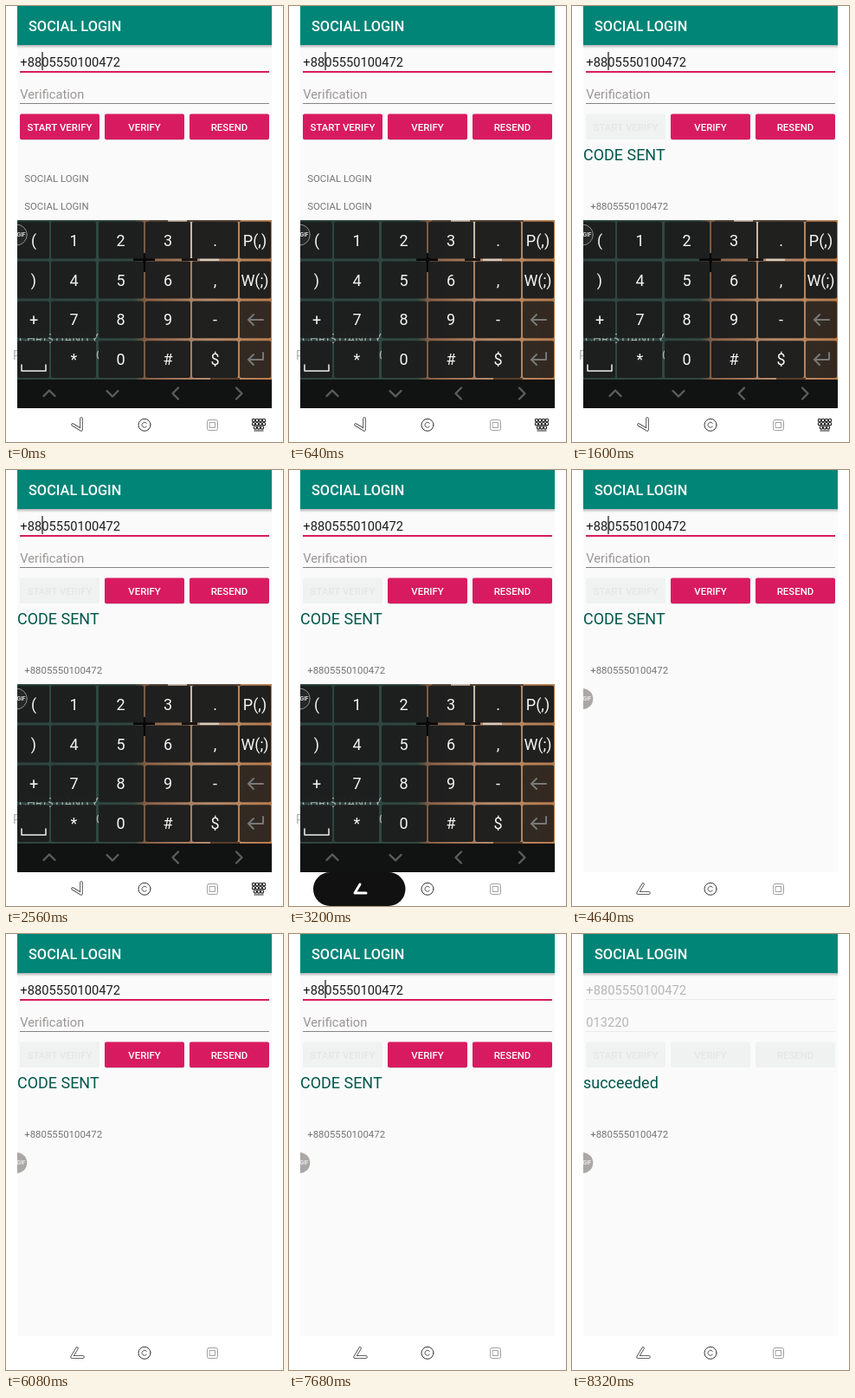
Animation, 320 px wide and 503 px high, one loop 9600 ms. Source, as an HTML page with a canvas:

```html
<!DOCTYPE html>
<html lang="en">
<head>
<meta charset="utf-8">
<title>Social login</title>
<style>
html, body { margin: 0; width: 100%; height: 100%; overflow: hidden; background: #fff; }
canvas { display: block; width: 320px; height: 503px; }
</style>
</head>
<body>
<canvas id="stage"></canvas>
<script>
const W = 320, H = 503, LOOP = 9600;
const LEFT = 13, RIGHT = 307;
const SENT = 1600, PRESS = 3040, TURN = 3200, HIDE = 3360, RELEASE = 3520, DONE = 8320;
// The caret starts visible and flips at each of these times.
const BLINKS = [160, 640, 1120, 1600, 2080, 2560, 3040, 3680, 4160, 4640,
  5120, 5600, 6080, 6560, 7200, 7680, 8160];
const PHONE = '+8805550100472';
const TEAL = '#008577', DEEP = '#00574b', PINK = '#d81b60';

const canvas = document.getElementById('stage');
const ctx = canvas.getContext('2d');
const dpr = window.devicePixelRatio || 1;
canvas.width = W * dpr;
canvas.height = H * dpr;

function rect(x, y, w, h, color) {
  ctx.fillStyle = color;
  ctx.fillRect(x, y, w, h);
}

function round(x, y, w, h, r, color) {
  ctx.beginPath();
  ctx.roundRect(x, y, w, h, r);
  ctx.fillStyle = color;
  ctx.fill();
}

function text(str, x, y, size, color, weight = 400, align = 'left') {
  ctx.font = `${weight} ${size}px Roboto, sans-serif`;
  ctx.textAlign = align;
  ctx.fillStyle = color;
  ctx.fillText(str, x, y);
}

function line(points, color, width) {
  ctx.beginPath();
  points.forEach(([x, y]) => ctx.lineTo(x, y));
  ctx.strokeStyle = color;
  ctx.lineWidth = width;
  ctx.stroke();
}

function ring(x, y, r, color, width, from = 0, to = Math.PI * 2) {
  ctx.beginPath();
  ctx.arc(x, y, r, from, to);
  ctx.strokeStyle = color;
  ctx.lineWidth = width;
  ctx.stroke();
}

function header() {
  const shade = ctx.createLinearGradient(0, 45, 0, 49);
  shade.addColorStop(0, 'rgba(0,0,0,.28)');
  shade.addColorStop(1, 'rgba(0,0,0,0)');
  rect(LEFT, 45, RIGHT - LEFT, 4, shade);
  rect(LEFT, 0, RIGHT - LEFT, 45, TEAL);
  text('SOCIAL LOGIN', 26, 29, 16.33, '#fff', 500);
}

function button(label, x, enabled) {
  if (enabled) {
    round(x, 125.4, 92, 29.4, 2, 'rgba(0,0,0,.18)');
    round(x, 124.5, 92, 29.4, 2, PINK);
  } else {
    round(x, 124.5, 92, 29.4, 2, '#eff2f1');
  }
  text(label, x + 46, 143.6, 11.43, enabled ? '#fff' : '#e3e7e6', 500, 'center');
}

function form(t) {
  const sent = t >= SENT, done = t >= DONE;
  const caret = BLINKS.filter(b => b <= t).length % 2 === 0;

  text(PHONE, 16.3, 69.6, 14.7, done ? '#b5b5b5' : '#1c1c1c');
  if (done) rect(16, 75, 288, 1, '#ebebeb');
  else rect(16, 75, 288, 2, PINK);
  if (caret && !done) rect(41.3, 53, 1.4, 21, '#333');

  text(done ? '013220' : 'Verification', 16.3, 106.6, 14.7, done ? '#b5b5b5' : '#9c9696');
  rect(16, 112, 288, 1, done ? '#ebebeb' : '#858585');

  button('START VERIFY', 16, !sent);
  button('VERIFY', 114, !done);
  button('RESEND', 212, !done);

  if (sent) {
    text(done ? 'succeeded' : 'CODE SENT', 13, 178, 17.97, DEEP);
  } else {
    text('SOCIAL LOGIN', 21.2, 203.3, 11.43, '#757575');
  }
  text(sent ? PHONE : 'SOCIAL LOGIN', 21.2, 235.3, 11.43, '#757575');
}

function backdrop() {
  const tone = ctx.createLinearGradient(LEFT, 0, RIGHT, 0);
  tone.addColorStop(0, '#2d4640');
  tone.addColorStop(.46, '#304740');
  tone.addColorStop(.51, '#8a6146');
  tone.addColorStop(.75, '#b48b6c');
  tone.addColorStop(1, '#b87c4c');
  rect(LEFT, 247, RIGHT - LEFT, 184, tone);
  rect(165, 247, 106, 2, '#56463a');
  rect(187, 247, 22, 2, '#c8b9a9');
  rect(213, 249, 2, 44, '#cbb8a5');
  rect(147, 291, 25, 3, '#080808');
  rect(158, 285, 4, 22, '#080808');
  rect(203, 291, 18, 3, '#181310');
  rect(224, 291, 22, 3, '#d7c9b9');
  rect(236, 429, 34, 2, '#5a3c29');
  text('CHRISTIANITY', 15, 389, 14, '#a9b1ae');
  text('R', 8, 408, 14, '#a9b1ae');
  text('C', 104, 408, 14, '#a9b1ae');
}

function chevron(x, y, turn) {
  ctx.save();
  ctx.translate(x, y);
  ctx.rotate(turn * Math.PI / 2);
  line([[-6.5, 3], [0, -3.5], [6.5, 3]], '#5c5c5c', 2.4);
  ctx.restore();
}

function keyboard() {
  const edges = [13, 52, 107, 161, 215, 270];
  const widths = [37, 52, 52, 52, 53, 36];
  const middles = [32, 78.5, 132.5, 187, 241.5, 287.5];
  const rows = [
    ['(', '1', '2', '3', '.', 'P(,)'],
    [')', '4', '5', '6', ',', 'W(;)'],
    ['+', '7', '8', '9', '-', ''],
    ['', '*', '0', '#', '$', '']
  ];
  backdrop();
  rows.forEach((row, r) => {
    const y = 248.8 + r * 45.8;
    row.forEach((label, c) => {
      const tool = c === 5 && r > 1;
      round(edges[c], y, widths[c], 42.8, 2, tool ? 'rgba(31,29,27,.87)' : 'rgba(29,30,30,.975)');
      text(label, middles[c], y + 28, 18, '#f4f4f4', 400, 'center');
    });
  });
  line([[18, 414], [18, 421], [46, 421], [46, 414]], '#f0f0f0', 1.5);
  line([[297, 362], [280, 362]], '#777', 2);
  line([[286, 356], [280, 362], [286, 368]], '#777', 2);
  line([[297, 400], [297, 408], [280, 408]], '#777', 2);
  line([[286, 402], [280, 408], [286, 414]], '#777', 2);

  rect(LEFT, 431, RIGHT - LEFT, 33, '#111212');
  chevron(50, 447, 0);
  chevron(123, 447, 2);
  chevron(196, 447, 3);
  chevron(269, 447, 1);
}

function bubble(dark) {
  ctx.save();
  ctx.beginPath();
  ctx.rect(LEFT, 247, 20, 34);
  ctx.clip();
  ctx.beginPath();
  ctx.arc(12.3, 264, 12, 0, Math.PI * 2);
  ctx.fillStyle = dark ? '#252827' : '#aaa7a6';
  ctx.fill();
  if (dark) ring(12.3, 264, 12, '#8b908e', 1);
  text('GIF', 12.6, 266.4, 6.5, '#f3f3f3', 500);
  ctx.restore();
}

function backIcon(down, pressed) {
  const arm = [[0, -5], [-6, 5], [7, 5]];
  ctx.save();
  ctx.translate(82, 483);
  if (down) ctx.rotate(-Math.PI / 2);
  if (pressed) {
    line(arm, '#fff', 3);
  } else {
    line(arm, '#333', 3.4);
    line(arm, '#fff', 1.8);
  }
  ctx.restore();
}

function keypadIcon() {
  for (let r = 0; r < 3; r++) {
    const n = 4 - (r === 2);
    for (let c = 0; c < n; c++) {
      ring(292 + (c - (n - 1) / 2) * 4, 478 + r * 4.2, 1.7, '#222', 1.1);
    }
  }
  line([[287, 490], [297, 490]], '#222', 1.2);
}

function navBar(t) {
  const pressed = t >= PRESS && t < RELEASE;
  if (pressed) round(28, 464, 106.5, 39, 19.5, '#111');
  backIcon(t < TURN, pressed);
  ring(160, 483.3, 7, '#333', 1);
  ring(160, 483.3, 3, '#555', 1, .7, 5.6);
  ctx.strokeStyle = '#a0a0a0';
  ctx.lineWidth = 1;
  ctx.beginPath();
  ctx.roundRect(232.5, 477.5, 12, 12, 2);
  ctx.rect(235.5, 480.5, 6, 6);
  ctx.stroke();
  if (t < TURN) keypadIcon();
}

function draw(t) {
  ctx.setTransform(dpr, 0, 0, dpr, 0, 0);
  ctx.lineCap = ctx.lineJoin = 'round';
  rect(0, 0, W, H, '#fff');
  rect(LEFT, 0, RIGHT - LEFT, 464, '#fafafa');
  header();
  form(t);
  if (t < HIDE) keyboard();
  bubble(t < HIDE);
  navBar(t);
}

const start = performance.now();
function tick() {
  draw((performance.now() - start) % LOOP);
  requestAnimationFrame(tick);
}
tick();
</script>
</body>
</html>
```
